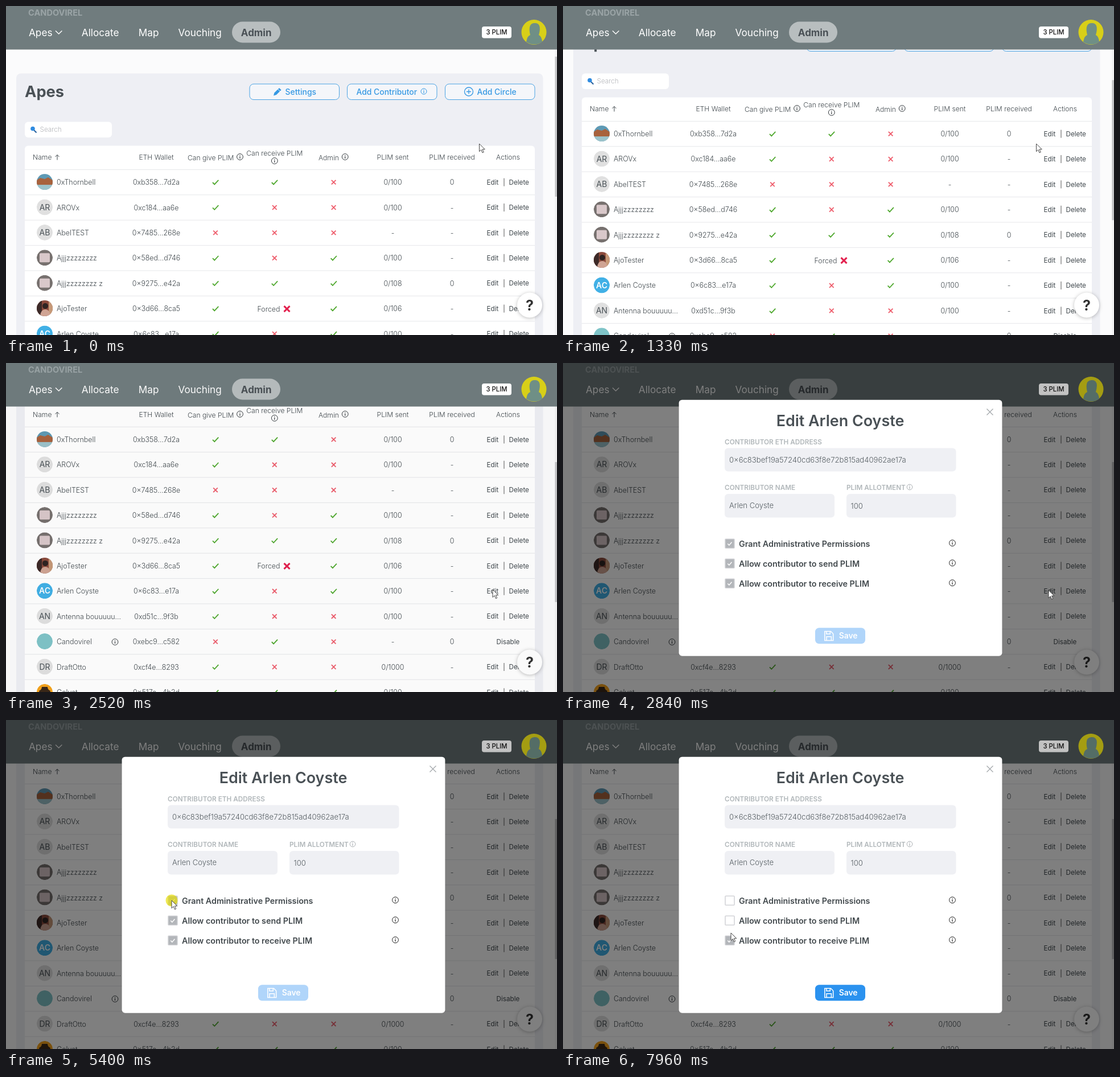
Write an HTML page that moves like this. It is 968 by 578 pixels and loops after 7990 ms.

```html
<!DOCTYPE html>
<html lang="en">
<head>
<meta charset="utf-8">
<title>Circle admin</title>
<style>
html, body { margin: 0; width: 100%; height: 100%; overflow: hidden; background: #fbfbfc; }
svg { display: block; width: 968px; height: 578px; font-family: Inter, sans-serif; }
.cell { font-size: 12.4px; font-weight: 300; fill: #3f474c; }
.head { font-size: 12.1px; font-weight: 300; fill: #3f474c; }
.action { font-size: 11.7px; fill: #3f474c; }
.initials { font-size: 14px; fill: #4a5257; }
.nav { font-size: 17.2px; fill: #fff; }
.active { font-size: 17px; font-weight: 700; fill: #4a5156; }
.brand { font-size: 14.6px; font-weight: 700; fill: #9aa4a6; }
.title { font-size: 27.3px; font-weight: 700; fill: #4a5156; }
.dialog-title { font-size: 26.9px; font-weight: 600; fill: #4a5156; }
.button { font-size: 13.9px; font-weight: 500; fill: #3598e3; }
.hint { font-size: 11.7px; font-weight: 300; fill: #b4b6ba; }
.badge { font-size: 11.3px; font-weight: 500; fill: #111; }
.label { font-size: 11.75px; font-weight: 600; fill: #b1b7ba; }
.field { font-size: 13.1px; font-weight: 300; fill: #555d62; }
.option { font-size: 14.3px; font-weight: 600; fill: #434a4e; }
.save { font-size: 13.9px; font-weight: 600; fill: #fff; }
.help { font-size: 25px; font-weight: 700; fill: #333; }
</style>
</head>
<body>
<svg id="stage" viewBox="0 0 968 578"></svg>
<script>
const LOOP = 7990, MODAL_AT = 2570, ROW = 44.4;
const NAME = 'Arlen Coyste', TOKEN = 'PLIM', BRAND = 'Candovirel';

const text = (x, y, str, cls, anchor = 'start') =>
  `<text x="${x}" y="${y}" dy=".364em" class="${cls}" text-anchor="${anchor}">${str}</text>`;
const rect = (x, y, w, h, r, fill, extra = '') =>
  `<rect x="${x}" y="${y}" width="${w}" height="${h}" rx="${r}" fill="${fill}" ${extra}/>`;
const circle = (x, y, r, fill, extra = '') =>
  `<circle cx="${x}" cy="${y}" r="${r}" fill="${fill}" ${extra}/>`;
const line = (d, color, width = 1, extra = '') =>
  `<path d="${d}" fill="none" stroke="${color}" stroke-width="${width}" ${extra}/>`;
const at = (x, y, body, extra = '') => `<g transform="translate(${x} ${y})" ${extra}>${body}</g>`;

const info = (x, y, color = '#33393d', r = 5.4) => at(x, y,
  circle(0, 0, r, 'none', `stroke="${color}"`) + line('M0 -.8V3M0 -3V-1.8', color, 1.2));
const tick = (x, y) => line(`M${x - 5} ${y + .4}l3.3 3.4 7-7.6`, '#4fa82e', 1.8);
const cross = (x, y, size = 3.8, color = '#ee5d6c', width = 1.8) =>
  line(`M${x - size} ${y - size}l${2 * size} ${2 * size}m0 ${-2 * size}l${-2 * size} ${2 * size}`, color, width);

const initials = (str, fill = '#e0e0e0', extra = '') =>
  circle(0, 0, 14, fill) + text(0, 0, str, 'initials', 'middle').replace('<text', '<text ' + extra);
const avatars = {
  beach: rect(-14, -14, 28, 28, 0, '#5e9ab5') +
    `<path d="M-14 -3l6-4 8 2 6-3 8 5V6H-14Z" fill="#a8623d"/>` + rect(-14, 5, 28, 9, 0, '#9cc3cb'),
  crate: circle(0, 0, 14, '#77716f') + rect(-9, -8, 18, 16, 2, '#d9c8ca'),
  person: rect(-14, -14, 28, 28, 0, '#8b4a3c') + rect(-14, -14, 9, 28, 0, '#3c2a28') + rect(7, -14, 7, 28, 0, '#c79a78') +
    circle(1, -4, 5, '#2f2422') + `<path d="M-8 14Q-7 2 1 2T10 14Z" fill="#d0a494"/>`,
  teal: circle(0, 0, 14, '#7fc4c8'),
  hat: circle(0, 0, 14, '#f5a31d') + `<path d="M-10 -2Q-5 -4 -5 -9H5Q5 -4 10 -2L6 14H-6Z" fill="#3a2818"/>`,
  AC: initials('AC', '#41b0e6', 'style="fill:#fff;font-weight:600"')
};

// name, avatar, wallet, flags (give, receive, admin), sent, received
const people = [
  ['0xThornbell', 'beach', '0xb358...7d2a', 'yyn', '0/100', '0'],
  ['AROVx', 'AR', '0xc184...aa6e', 'ynn', '0/100', '-'],
  ['AbelTEST', 'AB', '0×7485...268e', 'nnn', '-', '-'],
  ['Ajjjzzzzzzzz', 'crate', '0×58ed...d746', 'yny', '0/100', '-'],
  ['Ajjjzzzzzzzz z', 'crate', '0×9275...e42a', 'yyy', '0/108', '0'],
  ['AjoTester', 'person', '0×3d66...8ca5', 'yfy', '0/106', '-'],
  [NAME, 'AC', '0×6c83...e17a', 'yny', '0/100', '-'],
  ['Antenna bouuuuu...', 'AN', '0xd51c...9f3b', 'ynn', '0/100', '-'],
  [BRAND, 'teal', '0xebc9...c582', 'nyn', '-', '0'],
  ['DraftOtto', 'DR', '0xcf4e...8293', 'ynn', '0/1000', '-'],
  ['Golvat', 'hat', '0×517e...4b2d', 'yyy', '0/100', '-']
];

function flag(kind, x) {
  if (kind === 'f') return text(441.5, .5, 'Forced', 'cell') + cross(493.5, .5, 5, '#e3224f', 3);
  return kind === 'y' ? tick(x, 0) : cross(x, 0);
}

function personRow([name, avatar, wallet, flags, sent, received], i) {
  const isBot = name === BRAND;
  const actions = isBot ? text(882, 0, 'Disable', 'action', 'middle')
    : text(844.5, 0, 'Edit', 'action') + line('M875 -7V7', '#555') + text(883.5, 0, 'Delete', 'action');
  return at(0, 309.6 + ROW * i,
    at(68, -.5, avatars[avatar] || initials(avatar), 'clip-path="url(#disc)"') +
    text(89, 0, name, 'cell') + (isBot ? info(191.5, .5) : '') +
    text(264, 0, wallet, 'cell', 'middle') +
    [...flags].map((kind, k) => flag(kind, 368 + 103.8 * k)).join('') +
    text(679.5, 0, sent, 'cell', 'middle') + text(783.5, 0, received, 'cell', 'middle') +
    actions + line('M33 22.2H929', '#e6e7ea'));
}

const outlineButton = (x, label, labelX) =>
  rect(x, 137, 157.5, 27.5, 7, '#f4f6fa', 'stroke="#4ba3e3"') + text(labelX, 150.5, label, 'button');

const page = rect(18, 118.5, 925.5, 900, 8, '#eeeff4') + text(33, 150.5, 'Apes', 'title') +
  outlineButton(428, 'Settings', 490.5) + outlineButton(599.5, 'Add Contributor', 615.5) + outlineButton(771.5, 'Add Circle', 827.5) +
  at(477, 150.5, `<path d="M-7 7l1.4-5L3-6.6 6.6-3-2 5.6Z" fill="#3598e3"/>` + line('M.5 -4.5l4 4', '#fff')) +
  info(734, 150, '#3598e3', 5) +
  circle(813, 150.5, 7.5, 'none', 'stroke="#3598e3" stroke-width="1.3"') + line('M809 150.5h8m-4-4v8', '#3598e3', 1.3) +
  rect(33, 203.5, 153, 27.5, 6, '#fff') +
  line('M49 218l4.5 4.5', '#255f9c', 2) + circle(47, 215.5, 3.8, '#2f8be0') + text(59.5, 217, 'Search', 'hint') +
  rect(33, 245.5, 896, 800, 6, '#fff') +
  text(47, 266, 'Name', 'head') + line('M90 270.5v-9m-3.5 3.5l3.5-3.5 3.5 3.5', '#3f474c') +
  text(264, 266, 'ETH Wallet', 'head', 'middle') +
  text(319, 267, `Can give ${TOKEN}`, 'head') + info(411, 265) +
  text(471.8, 258.5, `Can receive ${TOKEN}`, 'head', 'middle') + info(471.8, 272) +
  text(549, 267, 'Admin', 'head') + info(595.7, 265) +
  text(679.5, 266, `${TOKEN} sent`, 'head', 'middle') + text(783.5, 266, `${TOKEN} received`, 'head', 'middle') +
  text(882, 266, 'Actions', 'head', 'middle') + line('M33 287.5H929', '#e6e7ea') +
  people.map(personRow).join('');

const header = rect(0, 0, 968, 76.5, 0, '#707c7e') + text(39, 12, BRAND.toUpperCase(), 'brand') +
  text(40, 46.5, 'Apes', 'nav') + line('M87 43.5l5.7 5.5 5.7-5.5', '#fff', 1.4) +
  text(132.8, 46.5, 'Allocate', 'nav') + text(232.8, 46.5, 'Map', 'nav') + text(302.5, 46.5, 'Vouching', 'nav') +
  rect(397, 27.5, 85, 37, 18.5, '#b8bebf') + text(439.7, 46.5, 'Admin', 'active', 'middle');

const account = rect(836, 36, 52, 20.5, 4, '#fff') + text(862, 46, `3 ${TOKEN}`, 'badge', 'middle') +
  circle(927.5, 46, 22, '#d8cf18') +
  `<path d="M914 63Q916 52 921 51Q916 30 929 30T936 51Q941 53 942 63Q928 72 914 63Z" fill="#6f8f86"/>`;

const options = ['Grant Administrative Permissions', `Allow contributor to send ${TOKEN}`, `Allow contributor to receive ${TOKEN}`];
const option = (label, i) => at(0, 317.3 + 35 * i,
  rect(285, -8, 16, 16, 1, '#fff', 'stroke="#d3d4d8" stroke-width="1.6"') +
  `<g id="check${i}">` + rect(285.5, -7.5, 15, 15, 0, '#b3b6ba') + line('M289.3 .3l2.5 2.5 4.7-5.4', '#fff', 1.4) + '</g>' +
  text(309, 0, label, 'option') + info(684, -1, '#222'));

const dialog = rect(203.6, 64.7, 567.8, 450, 5.5, '#fff') + cross(750, 86, 5.5, '#a6aaad', 1.4) +
  text(487, 101.5, `Edit ${NAME}`, 'dialog-title', 'middle') +
  text(284, 138.5, 'CONTRIBUTOR ETH ADDRESS', 'label') + rect(284, 149.5, 406.5, 41, 6, '#eff0f4') +
  text(292, 170, '0×6c83bef19a57240cd63f8e72b815ad40962ae17a', 'field') +
  text(284, 218.5, 'CONTRIBUTOR NAME', 'label') + rect(284, 230, 193, 41.5, 6, '#eff0f4') + text(292, 250.5, NAME, 'field') +
  text(498, 218.5, `${TOKEN} ALLOTMENT`, 'label') + info(609, 218, '#a9aeb2', 4.8) +
  rect(498, 230, 192.5, 41.5, 6, '#eff0f4') + text(505.5, 251, '100', 'field') +
  options.map(option).join('') +
  rect(443, 465.3, 88, 28, 7, '#2b92ef', 'id="save"') +
  line('M459.8 471.5h10.7l4.2 4.2v11.8h-14.9Zm3 0v4.6h6.5v-4.6M463 487.2v-6.4h8.4v6.4', '#fff', 1.5) +
  text(484.7, 479.3, 'Save', 'save');

const stage = document.getElementById('stage');
stage.innerHTML = `<clipPath id="disc"><circle r="14"/></clipPath>` +
  rect(0, 0, 968, 578, 0, '#fbfbfc') + `<g id="page">${page}</g>` +
  rect(964, 76, 4, 502, 0, '#f3f3f4') + rect(964.5, 89, 3.5, 246, 0, '#c3c4c6', 'id="thumb"') + header +
  circle(920, 525.5, 22, '#fff', 'style="filter:drop-shadow(0 1px 3px #0004)"') + text(920, 526, '?', 'help', 'middle') +
  rect(0, 0, 968, 578, 0, '#000', 'id="backdrop"') + `<g id="account">${account}</g><g id="dialog">${dialog}</g>` +
  circle(0, 0, 10.5, '#e6de00', 'id="click" opacity=".66"') +
  `<path id="cursor" d="M0 0V13.6L3.3 10.6 5.5 15.8 7.7 14.8 5.5 9.8H9.8Z" fill="#fff" stroke="#333" stroke-width=".9"/>`;
const part = Object.fromEntries([...stage.querySelectorAll('[id]')].map(el => [el.id, el]));

const scrollKeys = [[1175, 0], [1330, 84.6], [1570, 167], [1970, 175.2]];
const cursorKeys = [
  [1600, 831.5, 242], [1900, 851, 400], [2060, 855, 409], [2230, 855, 398],
  [2810, 855, 398], [2880, 846, 401], [3350, 310, 302], [3480, 285, 301], [3630, 299, 306],
  [3850, 306, 318], [4200, 284, 320], [4440, 290, 316], [4930, 291, 317],
  [5670, 291, 317], [5980, 425, 450], [6060, 433, 455], [6160, 425, 448], [6460, 286, 355],
  [6640, 286, 355], [6800, 280, 374], [6930, 299, 386], [7140, 287, 376],
  [7730, 287, 376], [7960, 295, 374]
];
const clicks = [[2250, 2370], [5400, 5520], [6510, 6630]];
const untickAt = [5480, 6590, Infinity];

// Monotone cubic interpolation of column c, at rest at both ends.
function sample(keys, t, c) {
  const last = keys.length - 1;
  if (t <= keys[0][0]) return keys[0][c];
  if (t >= keys[last][0]) return keys[last][c];
  const i = keys.findIndex(k => k[0] > t) - 1;
  const slope = j => (keys[j + 1][c] - keys[j][c]) / (keys[j + 1][0] - keys[j][0]);
  const tangent = j => {
    if (j === 0 || j === last) return 0;
    const a = slope(j - 1), b = slope(j);
    return a * b > 0 ? 2 * a * b / (a + b) : 0;
  };
  const span = keys[i + 1][0] - keys[i][0], u = (t - keys[i][0]) / span;
  const ease = u * u * (3 - 2 * u);
  return keys[i][c] * (1 - ease) + keys[i + 1][c] * ease +
    span * u * (1 - u) * (tangent(i) * (1 - u) - tangent(i + 1) * u);
}

const show = (el, on) => el.setAttribute('visibility', on ? 'inherit' : 'hidden');
const move = (el, x, y) => el.setAttribute('transform', `translate(${x} ${y})`);

function draw(t) {
  const scroll = sample(scrollKeys, t, 1);
  const x = sample(cursorKeys, t, 1), y = sample(cursorKeys, t, 2);
  const open = t >= MODAL_AT;
  move(part.page, 0, -scroll);
  move(part.thumb, 0, scroll * .485);
  move(part.cursor, x, y);
  move(part.click, x, y);
  show(part.click, clicks.some(([from, to]) => t >= from && t < to));
  show(part.dialog, open);
  part.backdrop.setAttribute('opacity', open ? .5 : t >= 2520 ? .02 : 0);
  part.account.style.filter = open ? 'brightness(.76)' : 'none';
  untickAt.forEach((time, i) => show(part['check' + i], open && t < time));
  part.save.setAttribute('fill', t < untickAt[0] ? '#b0d5fa' : '#2b92ef');
}

const start = performance.now();
function frame() {
  draw((performance.now() - start) % LOOP);
  requestAnimationFrame(frame);
}
draw(0);
frame();
</script>
</body>
</html>
```
